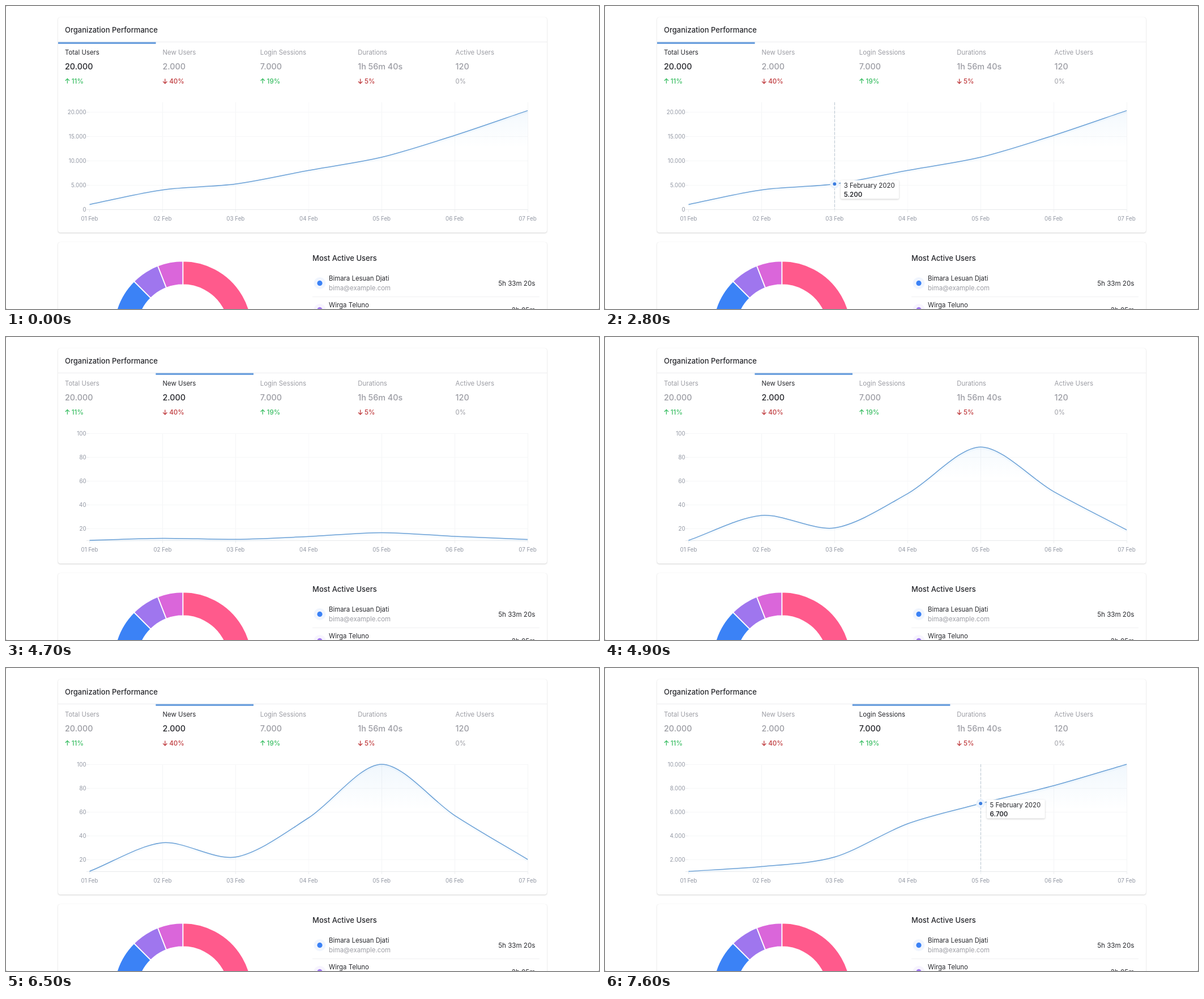
Recreate the animation shown at these times as an HTML page. Size 1047x535 px, loop 8 s.

```html
<!DOCTYPE html>
<html lang="en">
<head>
<meta charset="utf-8">
<title>Organization Performance</title>
<style>
  html, body { margin: 0; width: 100%; height: 100%; overflow: hidden; background: #c8c8c8; }
  #stage { position: absolute; left: 0; top: 0; width: 1047px; height: 535px; overflow: hidden; background: #fff; border-radius: 3px; }
  .card { position: absolute; left: 92px; width: 863px; border-radius: 4px; background: #fff;
    box-shadow: 0 0 1px rgba(0, 0, 0, .1), 0 1px 3px rgba(0, 0, 0, .11), 0 1px 2px rgba(0, 0, 0, .07); }
  svg { position: absolute; left: 0; top: 0; font-family: Inter, "Open Sans", sans-serif; }
  .tip { filter: drop-shadow(0 1px 1.5px rgba(0, 0, 0, .2)); }
</style>
</head>
<body>
<div id="stage">
  <div class="card" style="top:20px;height:380px"></div>
  <div class="card" style="top:417px;height:300px"></div>
  <svg width="1047" height="535" viewBox="0 0 1047 535">
    <defs>
      <linearGradient id="fade" gradientUnits="userSpaceOnUse" x1="0" y1="170" x2="0" y2="250">
        <stop offset="0" stop-color="#4299e1" stop-opacity=".075"/>
        <stop offset="1" stop-color="#4299e1" stop-opacity="0"/>
      </linearGradient>
    </defs>
    <g id="fixed"></g>
    <g id="live"></g>
  </svg>
</div>
<script>
const LOOP = 8000, STEP = 100, TOP = 170, BASE = 359, GROW = 330, LEAD = 12, TENSION = .3;
const DARK = '#27282d', GREY = '#9c9da4', AXIS = '#9297a3', UP = '#37bd61', DOWN = '#bf3a3d';

const tabs = [
  { name: 'Total Users', value: '20.000', change: 11, min: 0, max: 22000, tick: 5000,
    data: [1000, 4000, 5200, 8000, 10700, 15200, 20300] },
  { name: 'New Users', value: '2.000', change: -40, min: 10, max: 100, tick: 20,
    data: [10, 34, 22, 55, 100, 57, 20] },
  { name: 'Login Sessions', value: '7.000', change: 19, min: 1000, max: 10000, tick: 2000,
    data: [1000, 1400, 2200, 5000, 6700, 8200, 10000] },
  { name: 'Durations', value: '1h 56m 40s', change: -5 },
  { name: 'Active Users', value: '120', change: 0 }
];

// [start, tab]
const tabSteps = [[-LOOP, 0], [4700, 1], [6900, 2]];
// [start, day index, opacity]
const hoverSteps = [[0, -1, 0], [2800, 2, 1], [3200, 3, 1], [3600, 2, 1], [3700, 1, 1], [4300, -1, 0],
  [5300, 2, .5], [5400, 2, 1], [5900, 4, 1], [6400, 4, .5], [6500, -1, 0], [7600, 4, 1]];

const latest = (steps, t) => steps.filter(s => s[0] <= t).pop();
const dayX = i => 147.5 + 128.92 * i;
const colX = i => 92 + 172.4 * i;
const valueY = (tab, v) => BASE - (v - tab.min) / (tab.max - tab.min) * (BASE - TOP);
const dots = n => String(n).replace(/\B(?=(\d{3})+$)/g, '.');

const text = (x, y, s, size = 11.4, fill = DARK, weight = 400, anchor = 'start') =>
  `<text x="${x}" y="${y}" font-size="${size}" fill="${fill}" font-weight="${weight}" text-anchor="${anchor}">${s}</text>`;
const line = (x1, y1, x2, y2, stroke, extra = '') =>
  `<line x1="${x1}" y1="${y1}" x2="${x2}" y2="${y2}" stroke="${stroke}" ${extra}/>`;
const circle = (x, y, r, fill, extra = '') =>
  `<circle cx="${x}" cy="${y}" r="${r}" fill="${fill}" ${extra}/>`;

function slice(from, to, fill) {
  const R = 122, r = 80.2;
  const at = (deg, radius) => {
    const a = deg * Math.PI / 180;
    return `${312.3 + radius * Math.sin(a)} ${572.4 - radius * Math.cos(a)}`;
  };
  return `<path d="M${at(from, R)}A${R} ${R} 0 0 1 ${at(to, R)}L${at(to, r)}A${r} ${r} 0 0 0 ${at(from, r)}Z"
    fill="${fill}" stroke="#fff" stroke-width="1.8"/>`;
}

function person(y, name, mail, time, color) {
  return circle(554, y, 10.5, color, 'opacity=".08"') + circle(554, y, 4.6, color) +
    text(570, y - 4.4, name) + text(570, y + 12.4, mail, 11.4, GREY) +
    text(934.4, y + 4.2, time, 11.6, DARK, 400, 'end');
}

function fixedParts() {
  let out = text(104, 47, 'Organization Performance', 13.04, DARK, 500) +
    line(92, 63.5, 955, 63.5, '#ebecee');
  tabs.forEach((tab, i) => {
    const x = colX(i) + 12, c = tab.change;
    if (!c) { out += text(x, 136.6, '0%', 11.4, GREY); return; }
    const color = c > 0 ? UP : DOWN;
    out += `<path d="M0 -4.2V4.2M-3.6 -.6L0 -4.2L3.6 -.6" transform="translate(${x + 4.4} 132.6) scale(1 ${Math.sign(c)})"
      fill="none" stroke="${color}" stroke-width="1.3"/>` + text(x + 11.8, 136.6, Math.abs(c) + '%', 11.6, color, 500);
  });
  for (let i = 0; i < 7; i++) {
    const x = Math.floor(dayX(i)) + .5;
    if (i) out += line(x, TOP, x, BASE, '#f3f4f6', i === 3 ? 'opacity=".4"' : '');
    out += line(x, BASE, x, 364, '#eceef0') + text(dayX(i), 378.7, `0${i + 1} Feb`, 9.78, AXIS, 400, 'middle');
  }
  out += line(142, 359.5, 921, 359.5, '#e8eaec');
  out += slice(0, 120, '#ff5a8c') + slice(240, 315, '#3b82f6') +
    slice(315, 338.7, '#9f76ee') + slice(338.7, 360, '#da66da');
  return out + text(541, 449.6, 'Most Active Users', 13.04, DARK, 500) +
    person(489.4, 'Bimara Lesuan Djati', 'bima@example.com', '5h 33m 20s', '#3b82f6') +
    line(541, 513.5, 942, 513.5, '#f0f1f3') +
    person(536.4, 'Wirga Teluno', '', '2h 05m', '#9f76ee');
}

// Smooth spline, handles kept inside the plot
function curve(tab, k) {
  const p = tab.data.map((v, i) => [dayX(i), valueY(tab, v)]);
  const put = ([x, y]) => `${x.toFixed(2)} ${(BASE + (Math.min(BASE, Math.max(TOP, y)) - BASE) * k).toFixed(2)}`;
  const handles = p.map((c, i) => {
    const a = p[i - 1] || c, b = p[i + 1] || c;
    const da = Math.hypot(c[0] - a[0], c[1] - a[1]), db = Math.hypot(b[0] - c[0], b[1] - c[1]);
    const move = f => c.map((v, n) => v + TENSION * f * (b[n] - a[n]));
    return [move(-da / (da + db)), move(db / (da + db))];
  });
  return p.reduce((d, c, i) => i
    ? `${d}C${put(handles[i - 1][1])} ${put(handles[i][0])} ${put(c)}` : 'M' + put(c), '');
}

function tooltip(tab, day, opacity) {
  const x = dayX(day), y = valueY(tab, tab.data[day]), lx = Math.floor(x) + .5;
  return `<g opacity="${opacity}">` +
    line(lx, TOP, lx, BASE, '#b7c4cf', 'stroke-dasharray="5 2.5"') +
    circle(x, y, 8, '#e9f2fc') + circle(x, y, 4.4, '#fff', 'opacity=".6"') + circle(x, y, 3, '#3b7de0') +
    `<rect class="tip" x="${x + 10.8}" y="${y - 6.8}" width="102.8" height="33" rx="2" fill="#fff"/>` +
    text(x + 16.4, y + 6.3, `${day + 1} February 2020`) +
    text(x + 16.4, y + 22.2, dots(tab.data[day]), 11.4, DARK, 600) + '</g>';
}

function liveParts(t) {
  const [start, active] = latest(tabSteps, t), [, day, opacity] = latest(hoverSteps, t);
  const tab = tabs[active], p = Math.min(1, (t - start + LEAD) / GROW), k = 1 - (1 - p) ** 2;
  let out = `<rect x="${colX(active)}" y="63.7" width="172.6" height="3.26" fill="#6b9fde"/>`;
  tabs.forEach((item, i) => {
    const x = colX(i) + 12, on = i === active;
    out += text(x, 86, item.name, 11.4, on ? DARK : GREY) +
      text(x, 112.2, item.value, 14.35, on ? DARK : GREY, 500);
  });
  for (let v = Math.ceil(tab.min / tab.tick) * tab.tick; v <= tab.max; v += tab.tick) {
    const y = valueY(tab, v), gy = Math.floor(y) + .5;
    if (v) out += line(142, gy, 147, gy, '#eceef0') + line(147, gy, 921, gy, '#f6f7f8');
    out += text(141.6, y + 3.5, dots(v), 9.78, AXIS, 400, 'end');
  }
  const d = curve(tab, k);
  out += `<path d="${d}V${BASE}H147.5Z" fill="url(#fade)"/>
    <path d="${d}" transform="translate(0 2)" fill="none" stroke="#4299e1" stroke-width="4" opacity=".05"/>
    <path d="${d}" fill="none" stroke="#6aa0d6" stroke-width="1.5"/>`;
  return out + (day < 0 ? '' : tooltip(tab, day, opacity));
}

const live = document.getElementById('live');
document.getElementById('fixed').innerHTML = fixedParts();
let shown = -1;
function draw() {
  const t = Math.floor(performance.now() % LOOP / STEP) * STEP;
  if (t !== shown) live.innerHTML = liveParts(shown = t);
  requestAnimationFrame(draw);
}
draw();
</script>
</body>
</html>
```
